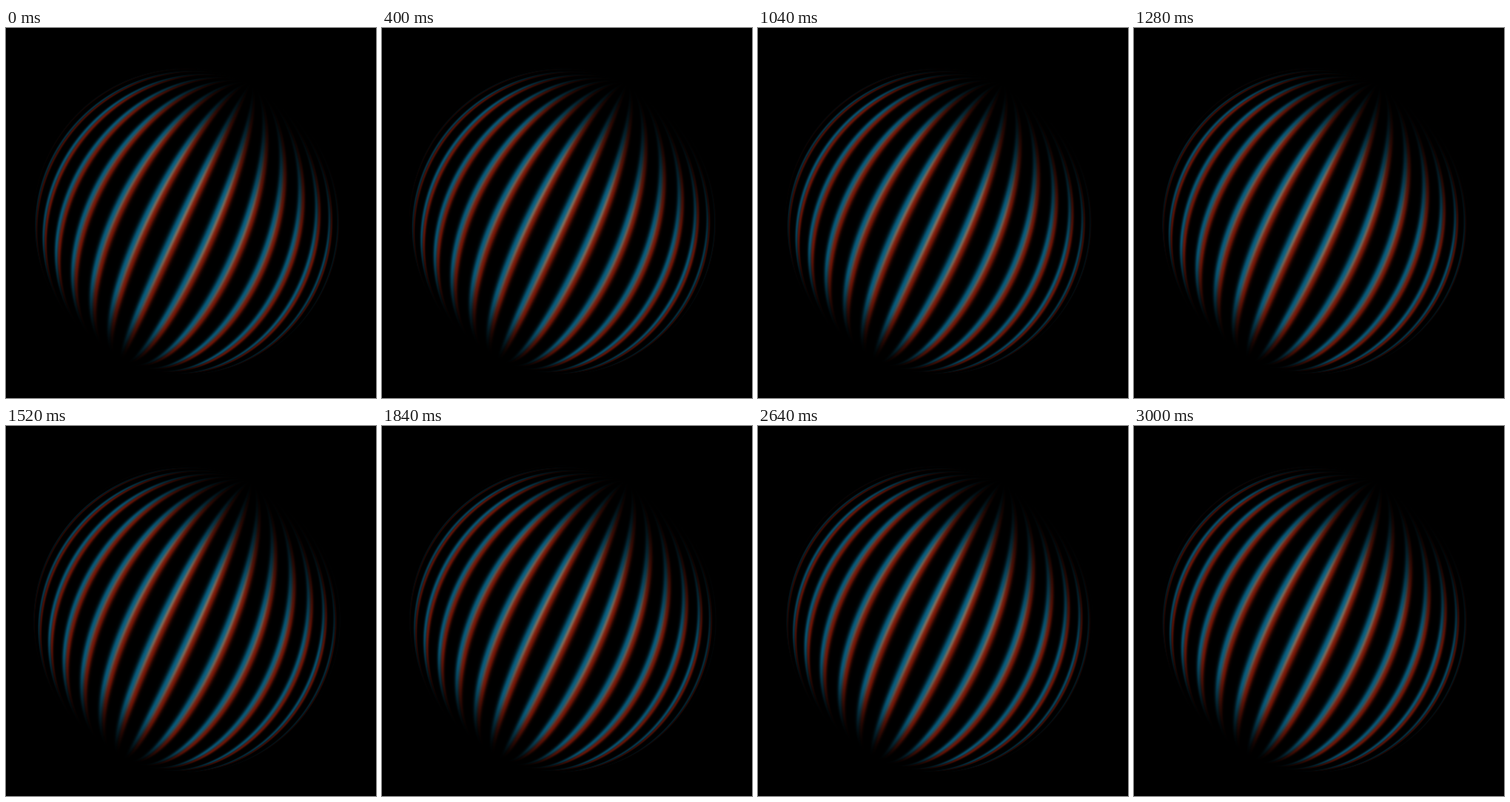
Recreate the animation shown at these times as an HTML page with a canvas. Size 500 by 500 pixels, loop 3040 ms.

```html
<!DOCTYPE html>
<html>
<head>
<meta charset="utf-8">
<style>
html, body { margin: 0; width: 100%; height: 100%; overflow: hidden; background: #000; }
canvas { display: block; }
</style>
</head>
<body>
<canvas id="stage" width="500" height="500"></canvas>
<script>
const SIZE = 500, LOOP = 3040, STEP = 40;
const CX = 244, CY = 260, R = 208;
const STRIPES = 30, TURN = 9;       // stripes on the sphere, stripes passed per loop
const TILT = 25 * Math.PI / 180;    // lean of the axis to the right
const NOD = 8 * Math.PI / 180;      // lean of the axis towards the viewer
const START = -0.13;                // stripe offset at time zero

const ctx = document.getElementById('stage').getContext('2d');
const img = ctx.createImageData(SIZE, SIZE);
const data = img.data;
for (let i = 3; i < data.length; i += 4) data[i] = 255;

const smooth = (a, b, v) => {
  const t = Math.min(1, Math.max(0, (v - a) / (b - a)));
  return t * t * (3 - 2 * t);
};
const bell = (v, w) => Math.exp(-v * v / (2 * w * w));

// Everything about a pixel that does not change: longitude, light, highlight
const points = [];
for (let y = 0; y < SIZE; y++) {
  for (let x = 0; x < SIZE; x++) {
    const dx = (x - CX) / R, dy = (y - CY) / R;
    const r2 = dx * dx + dy * dy;
    if (r2 >= 1) continue;
    const z = Math.sqrt(1 - r2);
    const across = dx * Math.cos(TILT) + dy * Math.sin(TILT);
    const along = dx * Math.sin(TILT) - dy * Math.cos(TILT);
    const depth = z * Math.cos(NOD) - along * Math.sin(NOD);
    const lon = Math.atan2(across, depth) / (2 * Math.PI) * STRIPES;
    const q = 0.6 * dx - 0.8 * dy;
    const ends = (1 - smooth(0.25, 1, q)) * smooth(-1, -0.6, q);
    const light = ends * smooth(0, 0.5, z) * (0.75 + 0.25 * z);
    if (light > 0.004) points.push({ at: (y * SIZE + x) * 4, lon, light, glow: z ** 3 });
  }
}

// One stripe: blue on the left, red on the right, pale where they meet
const N = 512;
const profile = Array.from({ length: N }, (_, i) => {
  const u = i / N - 0.5;
  return { blue: bell(u + 0.105, 0.08), red: bell(u - 0.1, 0.075), mid: bell(u, 0.045) };
});

function draw(t) {
  const shift = START + TURN * t / LOOP;
  for (const { at, lon, light, glow } of points) {
    const u = lon - shift + 0.5;
    const { blue, red, mid } = profile[Math.floor((u - Math.floor(u)) * N) % N];
    const m = mid * glow;
    data[at] = light * (6 * blue + 116 * red + 72 * m);
    data[at + 1] = light * (92 * blue + 20 * red + 56 * m);
    data[at + 2] = light * (126 * blue + 4 * red + 34 * m);
  }
  ctx.putImageData(img, 0, 0);
}

let last = -1;
const begin = performance.now();
function tick() {
  const frame = Math.floor(((performance.now() - begin) % LOOP) / STEP);
  if (frame !== last) draw((last = frame) * STEP);
  requestAnimationFrame(tick);
}
tick();
</script>
</body>
</html>
```
